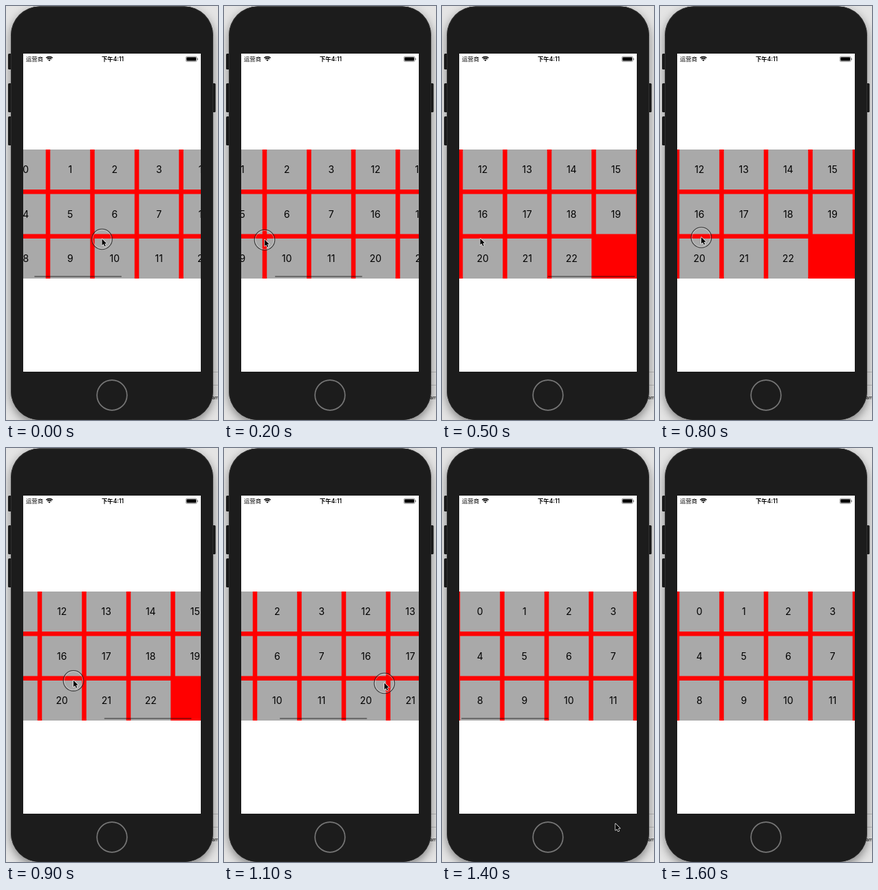
Animation of 308 by 600 pixels, one loop 1.7 s. Source, as an HTML page with a canvas:

```html
<!DOCTYPE html>
<html lang="zh-CN">
<head>
<meta charset="utf-8">
<title>Paged grid</title>
<style>
html, body { margin: 0; width: 100%; height: 100%; overflow: hidden; background: #e4e4e4; }
canvas { display: block; width: 308px; height: 600px; }
</style>
</head>
<body>
<canvas id="stage" width="308" height="600"></canvas>
<script>
const ctx = document.getElementById('stage').getContext('2d');
const LOOP = 1700, STEP = 100;
const SCREEN = { x: 25, y: 69, w: 258, h: 461 };
const GRID = { y: 208, h: 187, pitch: 64.5, cell: 58, inset: 3.25 };
const ITEMS = 23;

// Tracks hold [time, value] points.
const scrollTrack = [[0, 28.5], [200, 95], [300, 200], [400, 245], [500, 256], [600, 258],
  [800, 258], [900, 234], [1000, 175], [1100, 109], [1200, 43], [1300, 10], [1400, 2], [1500, 0]];
const barTrack = [[0, 1], [500, 1], [600, 0.5], [700, 0], [800, 0], [900, 1],
  [1400, 1], [1500, 0.5], [1600, 0]];
const pointerX = [[0, 139.5], [200, 59], [400, 54], [800, 60], [900, 98], [1000, 166],
  [1100, 233], [1200, 250], [1300, 246], [1400, 252]];
const pointerY = [[0, 338], [200, 339], [400, 338], [800, 335.5], [1100, 341], [1200, 346],
  [1300, 456], [1400, 545]];

function sample(track, t) {
  const i = track.findIndex(point => point[0] > t);
  if (i < 0) return track[track.length - 1][1];
  if (i === 0) return track[0][1];
  const [t0, a] = track[i - 1], [t1, b] = track[i];
  return a + (b - a) * (t - t0) / (t1 - t0);
}

function rect(color, x, y, w, h) {
  ctx.fillStyle = color;
  ctx.fillRect(x, y, w, h);
}

function rounded(color, x, y, w, h, r) {
  ctx.fillStyle = color;
  ctx.beginPath();
  ctx.roundRect(x, y, w, h, r);
  ctx.fill();
}

function ring(color, x, y, r, width) {
  ctx.strokeStyle = color;
  ctx.lineWidth = width;
  ctx.beginPath();
  ctx.arc(x, y, r, 0, Math.PI * 2);
  ctx.stroke();
}

function label(text, x, y, font, align = 'center') {
  ctx.fillStyle = '#000';
  ctx.font = font + ' Inter, "Noto Sans CJK SC", "Noto Sans CJK", sans-serif';
  ctx.textAlign = align;
  ctx.fillText(text, x, y);
}

function drawPhone() {
  rect('#e4e4e4', 0, 0, 308, 600);
  rect('#bcbcbc', 300, 530, 8, 1);
  rect('#bcbcbc', 300, 549, 8, 1);
  label('am', 299, 570, '7px', 'left');

  ctx.save();
  ctx.shadowColor = 'rgba(0,0,0,.45)';
  ctx.shadowBlur = 14;
  ctx.shadowOffsetY = 5;
  rounded('#1c1c1c', 7, 0.5, 294, 599.5, 42);
  ctx.restore();

  for (const [x, y, h] of [[3, 69, 23], [3, 112, 42], [3, 160, 42], [299, 112, 42]]) {
    rounded('#191919', x, y, 5.5, h, 1.5);
  }
  rounded('#303030', 7, 0.5, 294, 599.5, 42);
  rounded('#1c1c1c', 8, 1.5, 292, 598, 41);
  ring('#767676', 154, 564, 21.8, 1.7);
  rect('#fff', SCREEN.x, SCREEN.y, SCREEN.w, SCREEN.h);
}

function drawStatus() {
  label('运营商', 29, 80, '8.4px', 'left');
  label('下午4:11', 155, 80, '600 8.4px');

  const arc = [Math.PI * 1.25, Math.PI * 1.75];
  ctx.strokeStyle = '#000';
  ctx.lineWidth = 1.5;
  for (const r of [6.6, 4.2]) {
    ctx.beginPath();
    ctx.arc(63, 80, r, ...arc);
    ctx.stroke();
  }
  ctx.fillStyle = '#000';
  ctx.beginPath();
  ctx.moveTo(63, 80);
  ctx.arc(63, 80, 2.4, ...arc);
  ctx.fill();

  ctx.strokeStyle = '#777';
  ctx.lineWidth = 0.7;
  ctx.beginPath();
  ctx.roundRect(261.3, 73.2, 16, 7.4, 1.8);
  ctx.stroke();
  rounded('#000', 262.3, 74.2, 14, 5.4, 1);
  rounded('#777', 278, 75.6, 1, 2.6, 0.5);
}

function drawGrid(scroll, barAlpha) {
  ctx.save();
  ctx.beginPath();
  ctx.rect(SCREEN.x, GRID.y, SCREEN.w, GRID.h);
  ctx.clip();
  rect('#f00', SCREEN.x, GRID.y, SCREEN.w, GRID.h);

  for (let i = 0; i < ITEMS; i++) {
    const page = Math.floor(i / 12), row = Math.floor(i % 12 / 4);
    const x = SCREEN.x + GRID.inset + page * SCREEN.w + (i % 4) * GRID.pitch - scroll;
    const y = GRID.y + row * GRID.pitch;
    rect('#a9a9a9', x, y, GRID.cell, GRID.cell);
    label(i, x + GRID.cell / 2, y + 34, '14px');
  }

  ctx.globalAlpha = barAlpha;
  rounded('rgba(0,0,0,.38)', 27 + scroll * 0.494, 391, 127, 2, 1);
  ctx.restore();
}

function drawPointer(x, y, touching) {
  if (touching) {
    ring('rgba(255,255,255,.4)', x, y, 13.6, 1);
    ring('rgba(35,35,35,.85)', x, y, 14.8, 1.1);
  }
  ctx.save();
  ctx.translate(x, y - 0.5);
  ctx.beginPath();
  for (const [px, py] of [[0, 0], [0, 9.4], [2.2, 7.4], [3.8, 11], [5.3, 10.3], [3.8, 6.9], [6.7, 6.7]]) {
    ctx.lineTo(px, py);
  }
  ctx.closePath();
  ctx.lineJoin = 'round';
  ctx.strokeStyle = '#fff';
  ctx.lineWidth = 1.3;
  ctx.stroke();
  ctx.fillStyle = '#000';
  ctx.fill();
  ctx.restore();
}

function draw(now) {
  const t = Math.floor(now % LOOP / STEP) * STEP;
  drawPhone();
  drawStatus();
  drawGrid(sample(scrollTrack, t), sample(barTrack, t));
  if (t < 1500) {
    const touching = t <= 200 || (t >= 700 && t <= 1100);
    drawPointer(sample(pointerX, t), sample(pointerY, t), touching);
  }
}

const start = performance.now();
function tick() {
  draw(performance.now() - start);
  requestAnimationFrame(tick);
}
tick();
</script>
</body>
</html>
```
